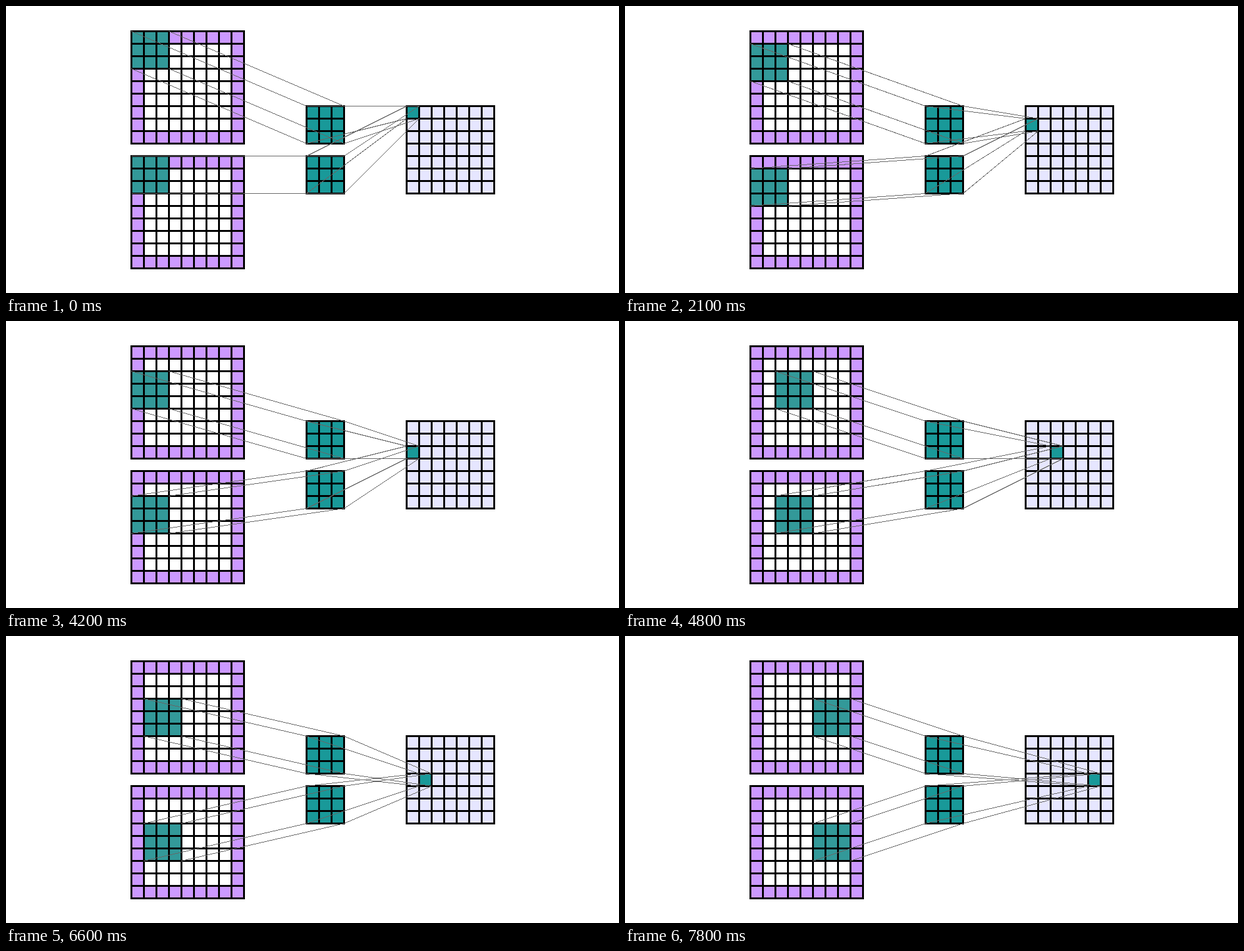
These frames come from a looping animation (980x460 px, 8000 ms). An HTML page:

```html
<!DOCTYPE html>
<html lang="en">
<head>
<meta charset="utf-8">
<title>Two-channel convolution</title>
<style>
  html, body { margin: 0; width: 100%; height: 100%; overflow: hidden; background: #fff; }
  svg { display: block; }
</style>
</head>
<body>
<svg width="980" height="460" viewBox="0 0 980 460" shape-rendering="crispEdges">
  <g id="stage" transform="translate(.5 .5)"></g>
</svg>
<script>
const CELL = 20, STEP = 300, LOOP = 8000, COLS = 7;
const INPUTS = [{ x: 200, y: 40 }, { x: 200, y: 240 }];
const KERNELS = [{ x: 480, y: 160 }, { x: 480, y: 240 }];
const OUTPUT = { x: 640, y: 160 };
const stage = document.getElementById('stage');

function add(tag, attrs) {
  const el = document.createElementNS('http://www.w3.org/2000/svg', tag);
  for (const key in attrs) el.setAttribute(key, attrs[key]);
  return stage.appendChild(el);
}

function square({ x, y }, cells, fill) {
  const size = cells * CELL;
  return add('rect', { x, y, width: size, height: size, fill });
}

function grid({ x, y }, cells) {
  const size = cells * CELL;
  let d = '';
  for (let i = 0; i <= size; i += CELL) {
    d += `M${x} ${y + i}h${size}M${x + i} ${y}v${size}`;
  }
  add('path', { d, fill: 'none', stroke: '#000', 'stroke-width': 3, 'stroke-linecap': 'round' });
}

const offset = (p, dx, dy) => ({ x: p.x + dx * CELL, y: p.y + dy * CELL });

function corners(p, cells) {
  return [p, offset(p, cells, 0), offset(p, 0, cells), offset(p, cells, cells)];
}

// Joins matching corners of two squares.
function rays(from, fromCells, to, toCells) {
  const ends = corners(to, toCells);
  return corners(from, fromCells)
    .map((a, i) => `M${a.x} ${a.y}L${ends[i].x} ${ends[i].y}`)
    .join('');
}

const patches = INPUTS.map(p => {
  square(p, 9, '#cc99ff');
  square(offset(p, 1, 1), 7, '#fff');
  const patch = square(p, 3, '#339999');
  grid(p, 9);
  return patch;
});

KERNELS.forEach(p => {
  square(p, 3, '#199999');
  grid(p, 3);
});

square(OUTPUT, 7, '#e6e6ff');
const result = square(OUTPUT, 1, '#199999');
grid(OUTPUT, 7);

const lines = add('path', { fill: 'none', stroke: '#666', 'stroke-width': 1 });

function place(el, { x, y }) {
  el.setAttribute('x', x);
  el.setAttribute('y', y);
}

function draw(time) {
  const step = Math.floor((time % LOOP) / STEP);
  const col = step % COLS, row = Math.floor(step / COLS);
  const target = offset(OUTPUT, col, row);
  let d = '';
  INPUTS.forEach((input, i) => {
    const p = offset(input, col, row);
    place(patches[i], p);
    d += rays(p, 3, KERNELS[i], 3) + rays(KERNELS[i], 3, target, 1);
  });
  place(result, target);
  lines.setAttribute('d', d);
}

const start = performance.now();
function tick() {
  draw(performance.now() - start);
  requestAnimationFrame(tick);
}
tick();
</script>
</body>
</html>
```
